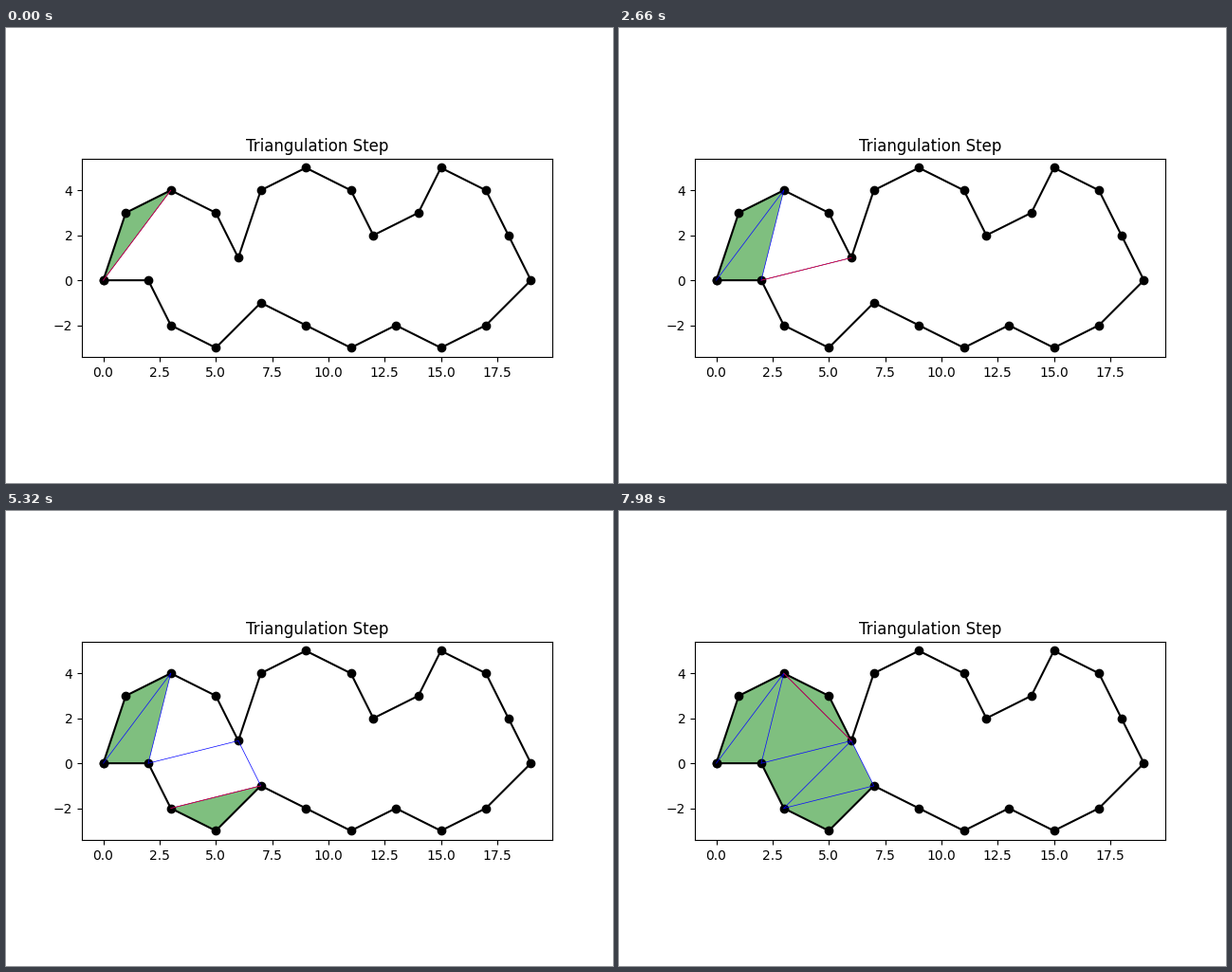
A matplotlib script that plays this animation: 640 by 480 pixels, repeating every 8 s.

```python
from itertools import combinations

import matplotlib.pyplot as plt
from matplotlib.animation import FuncAnimation

INTERVAL = 20
LOOP = 8000
STEP = 1330

# Corners clockwise: the upper chain to the right, the lower chain back.
XS = [0, 1, 3, 5, 6, 7, 9, 11, 12, 14, 15, 17, 18, 19, *range(17, 2, -2), 2]
YS = [0, 3, 4, 3, 1, 4, 5, 4, 2, 3, 5, 4, 2, 0, -2, -3, -2, -3, -2, -1, -3, -2, 0]
COUNT = len(XS)

# Corner indices joined at each step.
DIAGONALS = [(0, 2), (2, 22), (4, 22), (4, 19), (19, 21), (4, 21), (2, 4)]


def trace(corners):
    return [XS[i] for i in corners], [YS[i] for i in corners]


def closed_triangles(edges, diagonal):
    """Triangles that the new diagonal completes."""
    a, b = diagonal
    return [(a, b, c) for c in range(COUNT)
            if {frozenset((a, c)), frozenset((b, c))} <= edges]


fig, ax = plt.subplots(figsize=(6.4, 4.8), dpi=100)
ax.plot(*trace([*range(COUNT), 0]), "ko-")
ax.set_aspect("equal")
ax.set_title("Triangulation Step")

edges = {frozenset((i, (i + 1) % COUNT)) for i in range(COUNT)}
layers = []
for diagonal in DIAGONALS:
    layer = [ax.fill(*trace(t), "g", alpha=0.5)[0]
             for t in closed_triangles(edges, diagonal)]
    layer += ax.plot(*trace(diagonal), "b-", lw=0.5)
    layers.append(layer)
    edges.add(frozenset(diagonal))
current, = ax.plot(*trace(DIAGONALS[0]), "r-", lw=0.5)


def draw(frame):
    # Rounds each change to the nearest frame.
    step = (frame * INTERVAL + INTERVAL // 2) // STEP
    for i, layer in enumerate(layers):
        for artist in layer:
            artist.set_visible(i <= step)
    current.set_data(*trace(DIAGONALS[step]))
    return [current]


anim = FuncAnimation(fig, draw, frames=LOOP // INTERVAL, interval=INTERVAL,
                     repeat=True, repeat_delay=0)
plt.show()
```
